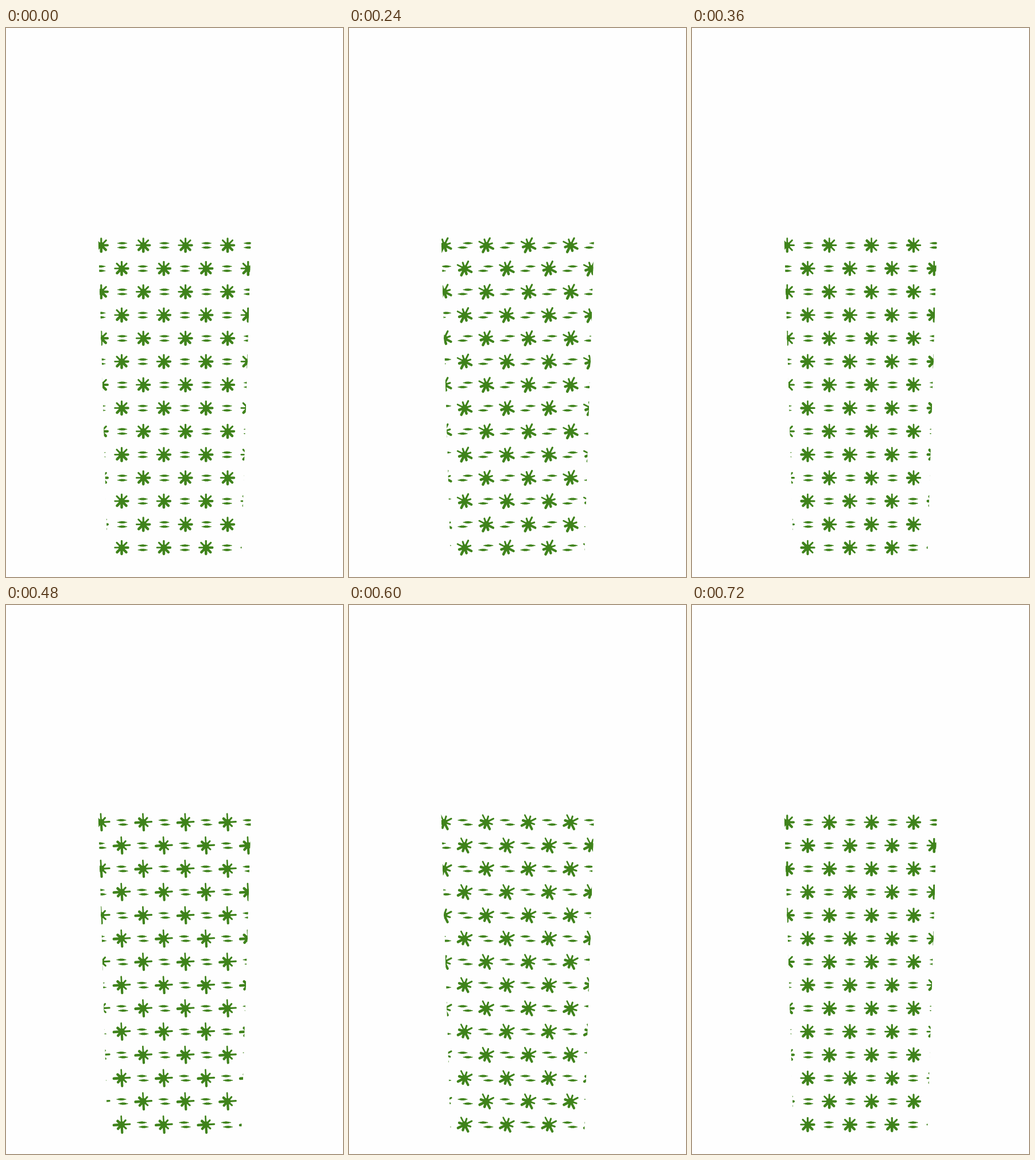
Write an HTML page with a canvas that moves like this. It is 587 px wide and 954 px high and loops after 750 ms.

```html
<!DOCTYPE html>
<html lang="en">
<head>
<meta charset="utf-8">
<title>Stitched stars</title>
<style>
  html, body { margin: 0; width: 100%; height: 100%; overflow: hidden; background: #fefefe; }
  canvas { display: block; }
</style>
</head>
<body>
<canvas id="stage" width="587" height="954"></canvas>
<script>
const ctx = document.getElementById('stage').getContext('2d');
const GREEN = '#3f831b';
const STEP = 30, LOOP = 750, HALF = 12;
const ROWS = 14, PITCH_X = 73.4, PITCH_Y = 40.42;
// Arm widths, clockwise from the right
const ARMS = [4.2, 4.5, 4.6, 4.6, 2.7, 3.1, 3.2, 3.1];

const panel = new Path2D('M160.5 360H427L409.8 927H177Z');
const lens = makeLens();

// Slim leaf with a slightly ragged, stitched edge
function makeLens() {
  const path = new Path2D(), n = 12, w = 9;
  path.moveTo(-w, 0);
  for (const side of [1, -1]) {
    for (let i = 1; i <= n; i++) {
      const s = i / n;
      const jag = i < n ? (i % 2 ? 0.25 : -0.25) : 0;
      path.lineTo(side * w * (2 * s - 1), -side * (2 * Math.sin(Math.PI * s) + jag));
    }
  }
  path.closePath();
  return path;
}

function drawStar(x, y, angle, stretch) {
  ctx.save();
  ctx.translate(x, y);
  ctx.rotate(angle);
  ARMS.forEach((width, i) => {
    const reach = i % 2 ? 13.6 - 1.9 * stretch : 13.2 + 2.8 * stretch;
    const a = i * Math.PI / 4, r = reach - width / 2;
    ctx.lineWidth = width;
    ctx.beginPath();
    ctx.moveTo(0, 0);
    ctx.lineTo(r * Math.cos(a), r * Math.sin(a));
    ctx.stroke();
  });
  ctx.beginPath();
  ctx.arc(0, 0, 5.6, 0, 2 * Math.PI);
  ctx.fill();
  ctx.restore();
}

function drawLens(x, y) {
  ctx.save();
  ctx.translate(x, y);
  ctx.fill(lens);
  ctx.restore();
}

function render(time) {
  const k = Math.floor((time % LOOP) / STEP) % (2 * HALF);
  const back = k >= HALF;
  const u = (k % HALF) / HALF;
  const turn = u ** 3;
  const angle = (back ? 1 - turn : turn) * Math.PI / 2;
  const stretch = Math.sin(Math.PI * u ** 0.75);
  const slide = (back ? -4.6 : 4.6) * Math.sin(Math.PI * u * u);

  ctx.fillStyle = '#fefefe';
  ctx.fillRect(0, 0, 587, 954);
  ctx.save();
  ctx.clip(panel);
  ctx.fillStyle = ctx.strokeStyle = GREEN;
  ctx.lineCap = 'round';
  for (let row = 0; row < ROWS; row++) {
    const y = 377.5 + row * PITCH_Y;
    const odd = row % 2;
    for (let col = 0; col < 5; col++) {
      const starX = (odd ? 201.5 : 165.8) + (col - odd) * PITCH_X;
      const lensX = (odd ? 164.8 : 202.5) + col * PITCH_X;
      drawStar(starX, y, angle, stretch);
      drawLens(lensX + slide, y - 3.6);
      drawLens(lensX - slide, y + 4);
    }
  }
  ctx.restore();
}

const start = performance.now();
function tick() {
  render(performance.now() - start);
  requestAnimationFrame(tick);
}
tick();
</script>
</body>
</html>
```
